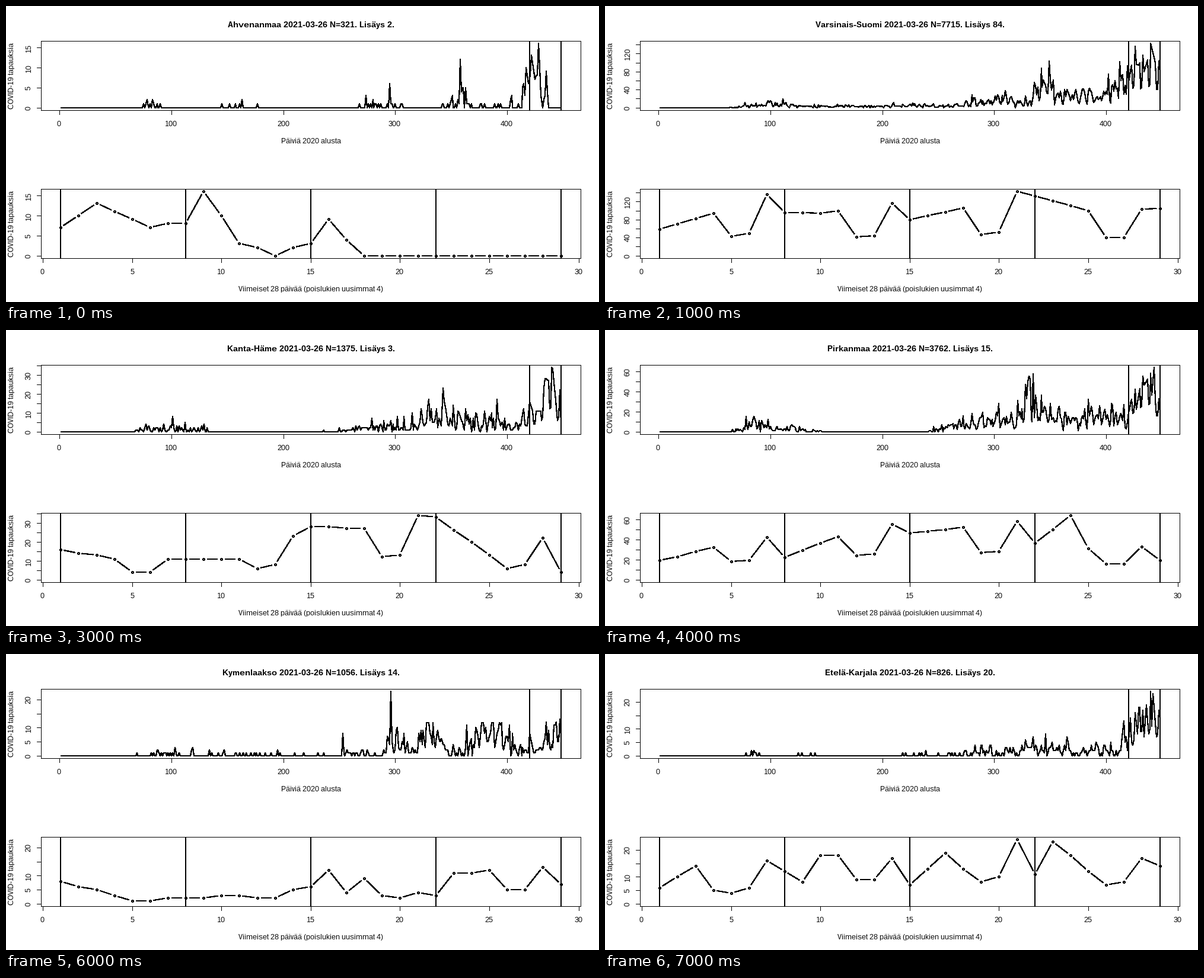
A matplotlib script for the animation above (8000 ms loop, 1000 by 500 pixels).

```python
import math
import numpy as np
import matplotlib.pyplot as plt
from matplotlib.animation import FuncAnimation
from matplotlib.patches import Circle, Rectangle

plt.rcParams.update({
    "font.family": "Liberation Sans",
    "text.hinting": "native",
    "text.hinting_factor": 1,
})

W, H, DPI = 1000, 500, 100
PX = 72 / DPI                       # points per pixel
LINE = 14.4                         # height of one margin line
LEFT, RIGHT = 4.1 * LINE, W - 2.1 * LINE
TOP, BOTTOM = 4.1 * LINE, 250 - 5.1 * LINE
MID = (LEFT + RIGHT) / 2
FIRST, LAST = 420, 448              # days of the close-up
OUTBREAK = 64                       # no cases before this day
BOLD = 1.2                          # aliased strokes this wide cover two pixels

DAYS = np.arange(1, LAST + 1)
WEEKEND = np.isin(DAYS % 7, (4, 5))

regions = []


def add_region(name, total, new, dip, waves, turns=(), peaks=()):
    """waves: (centre day, width, height) of bell-shaped waves;
    turns: key points of the close-up; peaks: (day, cases) outbreaks;
    dip: share of the cases that is reported at weekends."""
    rng = np.random.default_rng(total)
    level = sum(h * np.exp(-((DAYS - c) / w) ** 2 / 2) for c, w, h in waves)
    level = level * np.where(WEEKEND, dip, 1) * (DAYS >= OUTBREAK)
    cases = rng.poisson(level * rng.gamma(8, 1 / 8, LAST))
    if turns:
        close_up = np.interp(DAYS - FIRST + 1, *zip(*turns))
        close_up = np.round(close_up * np.where(WEEKEND, dip, 1))
        cases = np.where(DAYS >= FIRST, close_up, np.minimum(cases, 0.9 * close_up.max()))
    for day, value in peaks:
        cases[day - 1] = value
    title = f"{name} 2021-03-26 N={total}. Lisäys {new}."
    regions.append((title, cases))


add_region("Ahvenanmaa", 321, 2, 1,
           waves=[(83, 5, 0.8), (155, 9, 0.3), (290, 12, 0.6), (357, 6, 2.5),
                  (385, 22, 0.3), (417, 2, 12)],
           turns=[(1, 7), (3, 13), (6, 7), (8, 8), (9, 16), (11, 3), (13, 0),
                  (15, 3), (16, 9), (18, 0), (29, 0)],
           peaks=[(295, 6), (358, 12)])

add_region("Varsinais-Suomi", 7715, 84, 0.4,
           waves=[(100, 16, 9), (170, 50, 2), (225, 40, 4), (282, 8, 9),
                  (308, 14, 22), (345, 7, 50), (380, 22, 38), (416, 9, 50)],
           turns=[(1, 59), (4, 94), (7, 136), (8, 96), (10, 94), (14, 117),
                  (15, 80), (18, 106), (21, 143), (25, 100), (29, 105)],
           peaks=[(342, 88), (349, 103), (412, 102)])

add_region("Satakunta", 1468, 11, 0.4,
           waves=[(95, 15, 2), (310, 20, 4), (345, 15, 8), (390, 30, 5),
                  (438, 16, 26)],
           peaks=[(440, 52)])

add_region("Kanta-Häme", 1375, 3, 0.4,
           waves=[(92, 13, 3), (122, 9, 2), (285, 18, 4), (338, 13, 9),
                  (385, 26, 6), (418, 5, 6)],
           turns=[(1, 16), (4, 11), (11, 11), (14, 23), (15, 28), (18, 27),
                  (21, 34), (22, 33), (25, 13), (28, 22), (29, 4)],
           peaks=[(342, 16), (391, 17)])

add_region("Pirkanmaa", 3762, 15, 0.5,
           waves=[(86, 8, 10), (115, 13, 3), (270, 13, 8), (300, 13, 13),
                  (334, 9, 34), (370, 26, 14), (396, 10, 15), (418, 5, 10)],
           turns=[(1, 19), (4, 32), (7, 42), (8, 22), (11, 43), (14, 55),
                  (15, 46), (21, 58), (22, 36), (24, 64), (25, 31), (28, 33),
                  (29, 19)],
           peaks=[(330, 50)])

add_region("Päijät-Häme", 2374, 24, 0.5,
           waves=[(95, 12, 3), (300, 22, 5), (345, 15, 14), (385, 28, 9),
                  (436, 18, 28)],
           peaks=[(440, 45)])

add_region("Kymenlaakso", 1056, 14, 0.4,
           waves=[(90, 10, 1), (150, 45, 0.3), (266, 7, 1.5), (301, 6, 7),
                  (333, 9, 10), (372, 7, 10), (390, 7, 11), (412, 9, 3)],
           turns=[(1, 8), (4, 3), (7, 2), (11, 3), (15, 6), (16, 12), (17, 4),
                  (18, 9), (22, 3), (23, 11), (28, 13), (29, 7)],
           peaks=[(253, 8), (296, 23)])

add_region("Etelä-Karjala", 826, 20, 0.5,
           waves=[(82, 5, 0.6), (135, 10, 0.3), (232, 8, 0.3), (285, 14, 1.6),
                  (340, 18, 4), (388, 20, 2), (417, 1.6, 15)],
           turns=[(1, 6), (3, 14), (4, 5), (7, 16), (9, 8), (10, 18), (14, 17),
                  (15, 7), (17, 19), (18, 13), (21, 24), (22, 11), (23, 23),
                  (25, 12), (28, 17), (29, 14)])

fig = plt.figure(figsize=(W / DPI, H / DPI), dpi=DPI, facecolor="white")
ax = fig.add_axes([0, 0, 1, 1])
CRISP = dict(antialiased=False, snap=False)


def thin(xs, ys):
    ax.plot(np.add(xs, 0.5), np.add(ys, 0.5), color="black", lw=PX,
            solid_capstyle="projecting", **CRISP)


def bold(xs, ys):
    ax.plot(xs, ys, color="black", lw=BOLD * PX, solid_capstyle="butt",
            solid_joinstyle="round", **CRISP)


def rules(xs, top, bottom):
    for x in xs:
        ax.add_patch(Rectangle((x - 1, top), 2, bottom - top + 1, fc="black", lw=0, **CRISP))


def write(x, y, text, size=12, **style):
    ax.text(x, y, text, size=size * PX, ha="center", va="baseline",
            rotation_mode="anchor", **style)


def tick_step(peak):
    return next(s for s in (1, 2, 5, 10, 20, 50) if peak / s < 7.5)


def panel(offset, x_range, x_ticks, peak, x_label):
    """Draw frame, axes and labels; return the data-to-pixel functions."""
    pad = 0.04 * (x_range[1] - x_range[0])
    x_low, x_high = x_range[0] - pad, x_range[1] + pad
    unit = (BOTTOM - TOP) / (1.08 * peak)

    def to_x(v):
        return np.floor(LEFT + (np.asarray(v) - x_low) / (x_high - x_low) * (RIGHT - LEFT))

    def to_y(v):
        return np.floor(offset + BOTTOM - (np.asarray(v) + 0.04 * peak) * unit)

    left, right = math.floor(LEFT), math.floor(RIGHT)
    top, bottom = math.floor(TOP) + offset, math.floor(BOTTOM) + offset
    ax.add_patch(Rectangle((left + 0.5, top + 0.5), right - left, bottom - top,
                           fill=False, lw=PX, **CRISP))
    for v in x_ticks:
        x = to_x(v)
        thin([x, x], [bottom, bottom + 7])
        write(x - 0.5, offset + BOTTOM + 1.85 * LINE, str(v))

    step, free_from = tick_step(peak), -math.inf
    for v in range(0, int(1.04 * peak) + 1, step):
        y = to_y(v)
        thin([left - 7, left], [y, y])
        half = 3.5 * len(str(v))
        if v * unit - half >= free_from:       # skip labels that would crowd
            write(LEFT - 1.2 * LINE, y + 0.5, str(v), rotation=90)
            free_from = v * unit + half + 10
    write(MID, offset + BOTTOM + 3.85 * LINE, x_label)
    write(LEFT - 3.2 * LINE, offset + (TOP + BOTTOM) / 2, "COVID-19 tapauksia", rotation=90)
    return to_x, to_y, top, bottom


def draw(frame):
    ax.clear()
    ax.set(xlim=(0, W), ylim=(H, 0))
    ax.axis("off")
    title, cases = regions[frame]
    peak = cases.max()
    write(MID, 36, title, 14, weight="bold")

    to_x, to_y, top, bottom = panel(0, (1, LAST), range(0, 401, 100), peak,
                                    "Päiviä 2020 alusta")
    bold(to_x(DAYS), to_y(cases))
    rules(to_x([FIRST, LAST]), top, bottom)

    to_x, to_y, top, bottom = panel(250, (1, 29), range(0, 31, 5), peak,
                                    "Viimeiset 28 päivää (poislukien uusimmat 4)")
    points = np.column_stack([to_x(np.arange(1, 30)), to_y(cases[FIRST - 1:])])
    for a, b in zip(points, points[1:]):
        gap = 6 * (b - a) / np.hypot(*(b - a))
        bold(*zip(a + gap, b - gap))
    for p in points:
        ax.add_patch(Circle(p + 0.5, 1.4, fill=False, lw=BOLD * PX, **CRISP))
    rules(to_x(range(1, 30, 7)), top, bottom)
    return []


animation = FuncAnimation(fig, draw, frames=len(regions), interval=1000,
                          init_func=lambda: [], repeat=True, repeat_delay=0)
plt.show()
```
